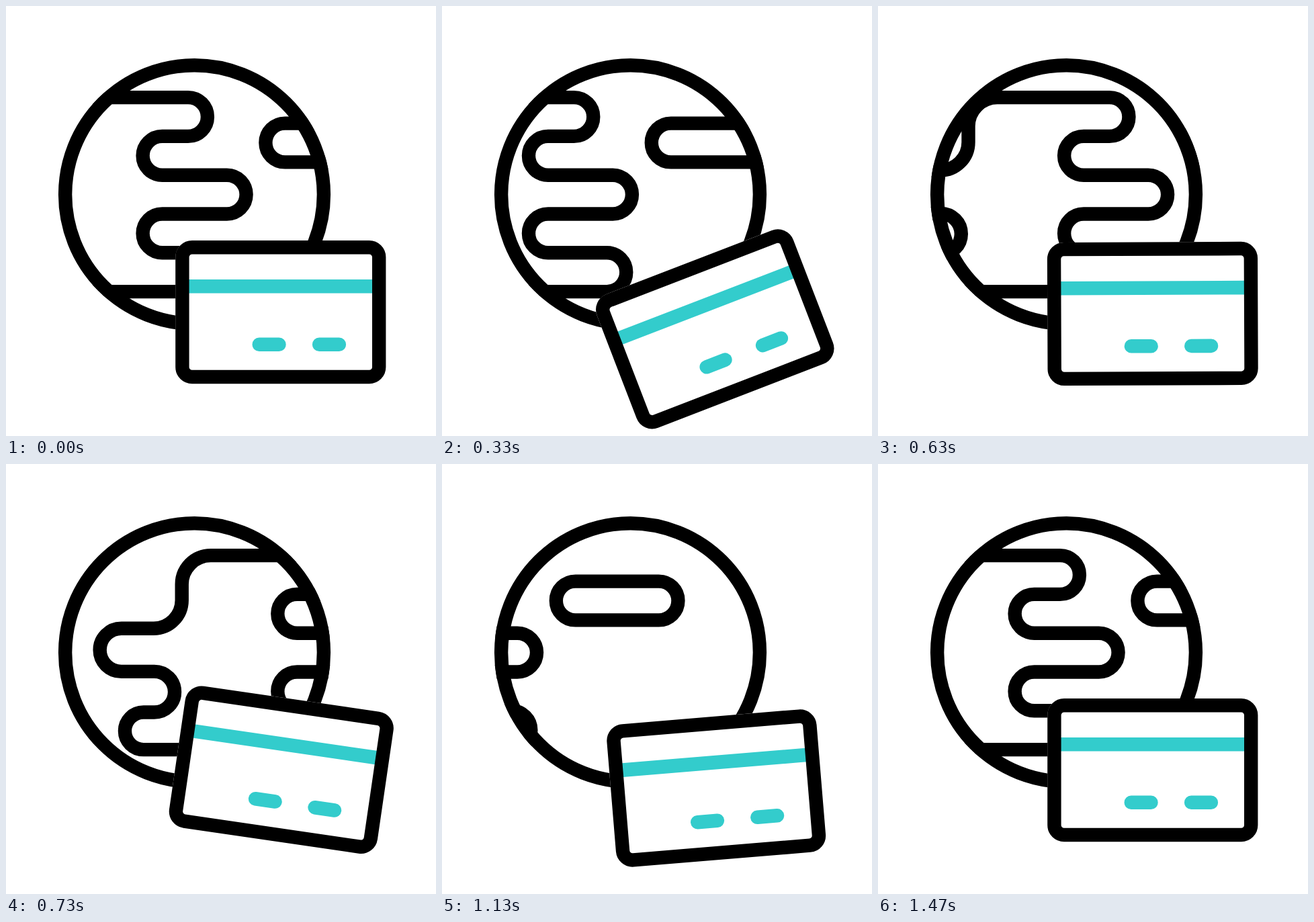
Recreate the animation shown at these times as an HTML page. Size 640x640 px, loop 2 s.

```html
<!DOCTYPE html>
<html lang="en">
<head>
<meta charset="utf-8">
<title>Globe and card</title>
<style>
  html, body { margin: 0; width: 100%; height: 100%; overflow: hidden; background: #fff; }
  svg { display: block; width: 100%; height: 100%; }
  .line { fill: none; stroke: #000; stroke-width: 20.4; }
  .accent { fill: none; stroke: #3cc; stroke-width: 20.6; }
</style>
</head>
<body>
<svg viewBox="0 0 640 640">
  <defs>
    <clipPath id="disc"><circle cx="280.5" cy="280.6" r="202.6"/></clipPath>
    <g id="lands" class="line">
      <path d="M104 136.1 H271 a28.9 28.9 0 0 1 0 57.8 H232.5 a28.9 28.9 0 0 0 0 57.8 H328.7
        a28.9 28.9 0 0 1 0 57.8 H232.5 a28.9 28.9 0 0 0 0 57.8 H320 a28.9 28.9 0 0 1 0 57.8
        H4 a27.8 27.8 0 0 1 0 -55.6 H20 a30.3 30.3 0 0 0 0 -60.6 H-29 a32 32 0 0 1 0 -64.2 H19
        a42 42 0 0 0 42 -42 V179.1 a43 43 0 0 1 43 -43 z"/>
      <rect x="386.4" y="174.6" width="181.6" height="57.8" rx="28.9"/>
    </g>
  </defs>

  <g clip-path="url(#disc)">
    <g id="map">
      <use href="#lands"/>
      <use href="#lands" x="-918"/>
    </g>
  </g>
  <circle class="line" cx="280.5" cy="280.6" r="192.4"/>

  <g id="card">
    <rect x="-156.6" y="-106.6" width="313.2" height="213.2" rx="25" fill="#fff"/>
    <path class="accent" d="M-140 -38.3 H140"/>
    <path class="accent" stroke-linecap="round" d="M-32 48.2 h29.6 M57.4 48.2 h29.6"/>
    <rect class="line" x="-146.4" y="-96.4" width="292.8" height="192.8" rx="14.6"/>
  </g>
</svg>
<script>
  const LOOP = 2000, FPS = 30, TURN = 918;
  const map = document.getElementById('map');
  const card = document.getElementById('card');

  // Timing curve like CSS cubic-bezier(), solved by bisection
  function bezier(x1, y1, x2, y2) {
    const curve = (a, b, s) => 3 * s * (1 - s) ** 2 * a + 3 * s * s * (1 - s) * b + s ** 3;
    return u => {
      let lo = 0, hi = 1;
      for (let i = 0; i < 24; i++) {
        const mid = (lo + hi) / 2;
        if (curve(x1, x2, mid) < u) lo = mid; else hi = mid;
      }
      return curve(y1, y2, lo);
    };
  }

  const swing = u => (1 - Math.cos(Math.PI * u)) / 2;
  const whirl = bezier(0.268, 0, 0.506, 0.82);

  // Moves from value to value; each stop is { at: step, to: value, ease }
  function track(...stops) {
    return k => {
      let from = 0, value = 0;
      for (const { at, to, ease = swing } of stops) {
        if (k < at) return value + (to - value) * ease((k - from) / (at - from));
        from = at;
        value = to;
      }
      return value;
    };
  }

  // The globe winds back, then whirls one full turn
  const spin = track({ at: 12, to: -80 }, { at: 44, to: TURN, ease: whirl });
  // The card rocks to a stop while it bobs twice
  const tilt = track({ at: 11.5, to: -22 }, { at: 23.5, to: 9.5 }, { at: 35, to: -5 }, { at: 44, to: 0 });
  const drop = track({ at: 10, to: 25.2 }, { at: 21.5, to: -0.5 }, { at: 34, to: 26.9 }, { at: 44, to: 0 });

  function draw(ms) {
    const k = Math.floor((ms + 4) * FPS / 1000) % (LOOP * FPS / 1000);
    const angle = tilt(k);
    const x = 408.8 + angle * 0.12, y = 455.6 + drop(k);
    map.setAttribute('transform', `translate(${spin(k) % TURN} 0)`);
    card.setAttribute('transform', `translate(${x} ${y}) rotate(${angle})`);
  }

  const start = performance.now();
  function tick() {
    draw((performance.now() - start) % LOOP);
    requestAnimationFrame(tick);
  }
  tick();
</script>
</body>
</html>
```
